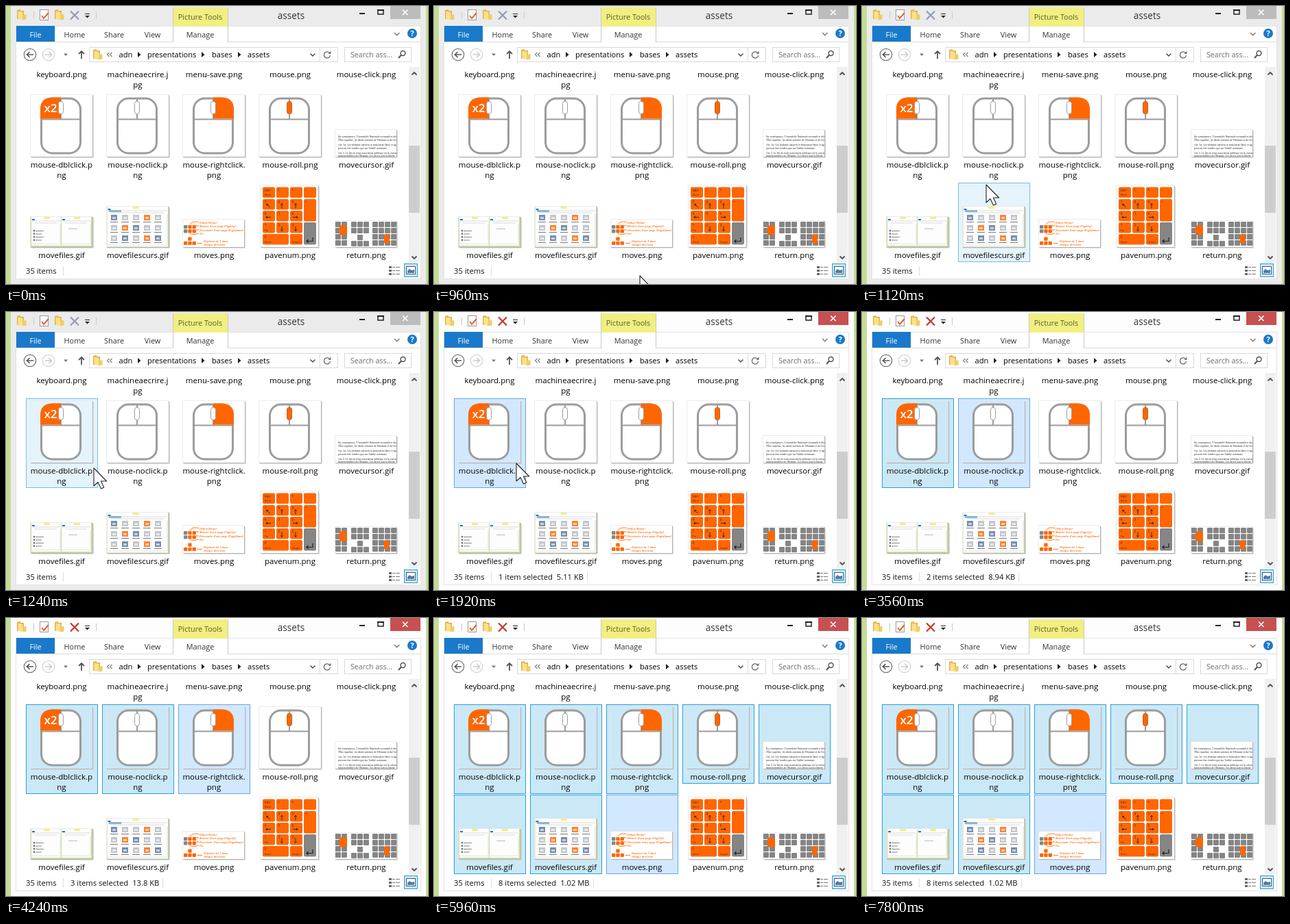
An HTML page for the animation above (8000 ms loop, 615 by 406 pixels).

```html
<!DOCTYPE html>
<html lang="en">
<head>
<meta charset="utf-8">
<title>Selecting several files</title>
<style>
html, body { margin: 0; width: 100%; height: 100%; overflow: hidden; background: #c5dc97; }
svg { display: block; width: 615px; height: 406px; font-family: "Open Sans", "Noto Sans", sans-serif; }
</style>
</head>
<body>
<svg id="stage" viewBox="0 0 615 406" xmlns="http://www.w3.org/2000/svg"></svg>
<script>
const LOOP = 8000, STEP = 40;
const ORANGE = '#ff6600', GREY = '#9c9c9c', KEY = '#858585', BLUE = '#1979ca';
const COLS = [29, 140, 251, 362, 473], CELL_W = 105;

const rect = (x, y, w, h, fill, more = '') =>
  `<rect x="${x}" y="${y}" width="${w}" height="${h}" fill="${fill}" ${more}/>`;
const box = (x, y, w, h, fill, line, more = '') =>
  rect(x + .5, y + .5, w - 1, h - 1, fill, `stroke="${line}" ${more}`);
const path = (d, line, width = 1, more = '') =>
  `<path d="${d}" fill="none" stroke="${line}" stroke-width="${width}" ${more}/>`;
const shape = (d, fill, more = '') => `<path d="${d}" fill="${fill}" ${more}/>`;
const text = (x, y, str, size, fill = '#111', more = '') =>
  `<text x="${x}" y="${y}" font-size="${size}" fill="${fill}" ${more}>${str}</text>`;
const mid = 'text-anchor="middle"';

// Rows of files: label lines per column
const rows = [
  { y: 104, names: ['keyboard.png', 'machineaecrire.j|pg', 'menu-save.png', 'mouse.png', 'mouse-click.png'] },
  { y: 236, names: ['mouse-dblclick.p|ng', 'mouse-noclick.p|ng', 'mouse-rightclick.|png', 'mouse-roll.png', 'movecursor.gif'] },
  { y: 368, names: ['movefiles.gif', 'movefilescurs.gif', 'moves.png', 'pavenum.png', 'return.png'] }
];
const cells = [];
rows.slice(1).forEach((row, i) => row.names.forEach((name, c) => cells.push({
  x: COLS[c], y: i ? 258 : 126, h: i ? 116 : name.includes('|') ? 131 : 116
})));

function labels() {
  return rows.map(row => row.names.map((name, c) => name.split('|').map((line, i) =>
    text(COLS[c] + 52, row.y + i * 15, line, 11.5, '#000', mid)).join('')).join('')).join('');
}

function thumb(x, y, w, h, fill = 'none') {
  return rect(x, y, w, h, fill) +
    path(`M${x - .5} ${y + h}V${y - .5}H${x + w}`, '#e6e6e6', 1, 'opacity=".8"') +
    path(`M${x + w + .5} ${y}V${y + h + .5}H${x}`, '#b4b4b4') +
    path(`M${x + w + 1.5} ${y + 2}V${y + h + 1.5}H${x + 2}`, '#d8d8d8', 1, 'opacity=".8"');
}

function mouse(c, kind) {
  const x = COLS[c] + 51;
  const dir = { left: -1, right: 1 }[kind];
  const button = dir && `M${x} 133.5H${x + dir * 13}Q${x + dir * 30} 134 ${x + dir * 30} 151V164.5H${x}Z`;
  const wheel = kind === 'wheel' ? [ORANGE, '#c2622a'] : ['#fff', GREY];
  return thumb(COLS[c] + 7, 130, 90, 90) +
    rect(x - 28.5, 135, 57, 80, '#fff', `rx="16" stroke="${GREY}" stroke-width="3"`) +
    path(`M${x - 28} 165.5H${x + 28}M${x} 135V165`, GREY, 2) +
    (button ? shape(button, ORANGE) : '') +
    rect(x - 3.5, 139.5, 7, 18, wheel[0], `rx="3" stroke="${wheel[1]}"`) +
    (kind === 'left' ? text(x - 15, 155, 'x2', 17, '#fff', 'font-weight="600" ' + mid) : '');
}

function legalText() {
  const lines = [
    [191.5, "En conséquence, l'Assemblée Nationale reconnaît et déclare, en présence"],
    [196.5, "l'Être suprême, les droits suivants de l'Homme et du Citoyen."],
    [204, 'Art. 1er. Les hommes naissent et demeurent libres et égaux en droits. Les'],
    [208.5, "peuvent être fondées que sur l'utilité commune."],
    [215.5, 'Art. 2. Le but de toute association politique est la conservation des droits'],
    [219.7, "imprescriptibles de l'Homme. Ces droits sont la liberté, la propriété,"]
  ];
  return thumb(480, 181, 89, 39, '#fff') + '<g clip-path="url(#legal)" font-family="Liberation Serif, serif">' +
    lines.map(([y, s]) => text(484, y, s, 3.8, '#222')).join('') + '</g>';
}

function miniWindow(x, y, w, h) {
  return rect(x, y, w, h, '#fdfdfd') + rect(x + w * .42, y, 9, 3, '#f3ee86') +
    rect(x + 1, y + 3, 4, 2, BLUE) + path(`M${x + 1} ${y + 6}h${w - 2}M${x + 5} ${y + 9}h${w - 11}`, '#ccc', .7) +
    path(`M${x + w - 1} ${y + 11}v${h - 15}`, '#ddd') + rect(x, y + h - 3, w, 1, '#e3e3e3');
}

function movefiles() {
  let s = thumb(36, 308, 90, 44, '#c5dc97') + miniWindow(37, 308, 43, 42) + miniWindow(81, 308, 43, 42);
  for (let i = 0; i < 4; i++)
    s += rect(40, 327 + i * 4.5, 2, 2.5, '#667') + rect(43, 328 + i * 4.5, i % 2 ? 9 : 12, 1, '#888');
  return s + rect(91, 325, 13, 1, '#bbb');
}

function movefilescurs() {
  let s = thumb(147, 293, 90, 59, '#c5dc97') + miniWindow(147.5, 293, 88.5, 58.5) +
    rect(150, 298, 18, 3, '#5f9bd0', 'opacity=".7"');
  for (let r = 0; r < 3; r++) for (let c = 0; c < 5; c++) {
    const x = 152 + c * 16, y = 305 + r * 15;
    const fill = (r * 2 + c) % 4 === 3 ? ORANGE : (r + c) % 3 ? '#b4b9c2' : '#55759c';
    s += rect(x + 1, y, 9, 8, fill, 'opacity=".8"') + rect(x + 3, y + 3, 5, 3, '#fff', 'opacity=".6"') +
      rect(x, y + 10, 11, 1, '#777');
  }
  return s;
}

function keys(x, y, cols, n, pitch, hot = false) {
  let s = '';
  for (let i = 0; i < n; i++)
    s += rect(x + i % cols * pitch, y + Math.floor(i / cols) * pitch, pitch - 1, pitch - 1,
      hot && i % cols ? ORANGE : KEY, 'rx="1"');
  return s;
}

function moves() {
  const word = (x, y, str) => text(x, y, str, 4.1, ORANGE, 'font-style="italic" font-weight="600"');
  return thumb(258, 312, 89, 40, '#fff') +
    keys(259, 320, 3, 6, 6.3, true) +
    path('M268 319C271 314 276 315 281 315.5M277 321Q279 320 281 321.5M277 327H281M268 332C271 335 277 333 281 332', ORANGE, .9) +
    word(282, 317.5, 'Début (Home)') + word(282, 323, "Monter d'une page (PageUp)") +
    word(282, 328.5, "Descendre d'une page (PageDown)") + word(282, 334, 'Fin') +
    rect(265.3, 337.5, 5.3, 5.3, ORANGE, 'rx="1"') +
    [259, 265.3, 271.6].map(x => rect(x, 343.8, 5.3, 5.3, ORANGE, 'rx="1"')).join('') +
    path('M279 346.5H286', ORANGE, .9) +
    word(288, 345, 'Déplacer de 1 dans') + word(288, 350, 'chaque direction');
}

function numpad() {
  const X = [374, 394, 414, 434], Y = [264.5, 282, 299, 316, 333];
  const key = (c, r, label = '', sub = '', w = 18, h = 15.5, fill = ORANGE) =>
    rect(X[c], Y[r], w, h, fill, 'rx="2"') + text(X[c] + 2.5, Y[r] + 6, label, 5, '#5a2600') +
    text(X[c] + 2.5, Y[r] + 12.5, sub, 4.3, '#5a2600');
  const arrow = (c, r, turn) => `<g transform="translate(${X[c] + 8} ${Y[r] + 9.5}) rotate(${turn})">` +
    path('M0 4V-3M-1.6 -1L0 -3.2L1.6 -1', '#222', .9) + '</g>';
  return thumb(371, 262, 84, 90) +
    key(0, 0, 'Verr', 'Num') + key(1, 0, '/') + key(2, 0, '*') + key(3, 0, '-') +
    key(0, 1, '7') + key(1, 1, '8') + key(2, 1, '9') + key(3, 1, '+', '', 18, 32.5) +
    key(0, 2, '4') + key(1, 2, '5') + key(2, 2, '6') +
    key(0, 3, '1', 'Fin') + key(1, 3, '2') + key(2, 3, '3') + key(3, 3, '', '', 18, 32.5, KEY) +
    key(0, 4, '0', 'Inser', 38) + key(2, 4, '.', 'Suppr') +
    arrow(0, 1, -45) + arrow(1, 1, 0) + arrow(2, 1, 0) + arrow(0, 2, -90) + arrow(2, 2, 90) +
    arrow(1, 3, 180) + arrow(2, 3, 180) +
    path('M447 338V343.5H438M440.5 341L438 343.5L440.5 346', '#222', 1.2);
}

function returnKeys() {
  return thumb(480, 314, 89, 38, '#fff') +
    keys(480, 315, 2, 8, 9) + rect(486, 320.5, 11, 14, ORANGE, 'rx="1"') +
    keys(503, 315, 3, 6, 9) + keys(512, 334, 1, 1, 9) + keys(503, 343, 3, 3, 9) +
    keys(534, 315, 4, 16, 9) + rect(551, 333.5, 7.5, 13, ORANGE, 'rx="1"');
}

const folder = (x, y) => shape(`M${x} ${y + 1}l5 -1v2h5v12h-10z`, '#e3b341') +
  shape(`M${x + 1.5} ${y + 2.5}l7 1.5v11.5l-7 -2z`, '#fbe18d') + shape(`M${x + 8.5} ${y + 8}l5 -1v7.5l-5 1z`, '#f0cc62');
const arrowhead = x => shape(`M${x - 2} 67l4.5 4l-4.5 4z`, '#222');

function titleBar() {
  return folder(16, 5) + path('M40.5 8V19M131.5 8V19M243.5 2V53M323.5 2V53', '#c9c9c9') +
    box(49, 5, 13, 16, '#fff', '#9a9a9a') + path('M52 14l3 4l7 -8', '#d9622f', 1.9) +
    folder(71, 5) + path('M94 7.5L106 19.5M106 7.5L94 19.5', '#8f9bb5', 2.2, 'id="trash"') +
    path('M115 11.5h7', '#222') + shape('M115 14h7l-3.5 3.5z', '#222') +
    rect(244, 2, 79, 28, '#f1ef80') + text(283, 20, 'Picture Tools', 10.9, '#5c5a2e', mid) +
    text(415.5, 19, 'assets', 13.6, '#333', mid) +
    rect(515, 10, 8, 2, '#222') + rect(542, 6, 8, 6, 'none', 'stroke="#222" stroke-width="1.5"') +
    rect(541, 5, 10, 2, '#222') + rect(560, 0, 44, 19, '#bcbcbc', 'id="close"') +
    path('M578 5.5l7.5 7.5M585.5 5.5l-7.5 7.5', '#fff', 1.7);
}

function ribbon() {
  const tab = (x, name, fill = '#333') => text(x, 45.5, name, 10.9, fill, mid);
  return rect(15, 29, 56, 23, BLUE) + rect(244, 30, 79, 23, '#fff') +
    tab(43, 'File', '#fff') + tab(100, 'Home') + tab(157.5, 'Share') + tab(213.5, 'View') + tab(283, 'Manage') +
    path('M566 39l3.7 3.7l3.7 -3.7', '#777', 1.4) +
    `<circle cx="592" cy="40" r="7" fill="${BLUE}"/>` + text(592, 44, '?', 11, '#fff', 'font-weight="700" ' + mid) +
    path('M14 52.5H243M324 52.5H604', '#dadbdc');
}

function navigation() {
  return '<g fill="none" stroke="#777" stroke-width="1.3"><circle cx="35" cy="71" r="8.7"/><circle cx="62" cy="71" r="8.7" stroke="#d4d4d4"/></g>' +
    path('M40 71H31M34.5 67L30.5 71L34.5 75', '#555', 1.7) + path('M57 71H66M62.5 67L66.5 71L62.5 75', '#ccc', 1.7) +
    shape('M84 69.5h6l-3 3.5z', '#777') + path('M110 77V66.5M106 70L110 66L114 70', '#555', 1.8) +
    box(121, 60, 363, 22, '#fff', '#d9d9d9') + path('M457.5 60V82', '#d9d9d9') + folder(127, 63) +
    path('M150.5 68l-3 3l3 3M154.5 68l-3 3l3 3', '#777', 1.1) +
    [[164.5, 'adn'], [206, 'presentations'], [300, 'bases'], [352, 'assets']].map(([x, n]) => text(x, 75, n, 11.1, '#000')).join('') +
    [194, 287, 340].map(arrowhead).join('') +
    path('M443.5 69.5l3.5 3.5l3.5 -3.5', '#444', 1.4) +
    path('M471.5 68.5A4.6 4.6 0 1 0 472.5 72', '#666', 1.3) + shape('M469.5 69.8h4v-4z', '#666') +
    box(493, 60, 98, 22, '#fff', '#d9d9d9') + text(502, 75, 'Search ass...', 10.7, '#6d6d6d') +
    '<circle cx="578.5" cy="69" r="3.4" fill="none" stroke="#555" stroke-width="1.5"/>' + path('M576 71.5L572 76', '#555', 2);
}

function scrollBar() {
  return rect(587, 89, 16, 285, '#f0f0f0') + rect(587, 204, 16, 98, '#cdcdcd') +
    path('M591.5 100.5l3.5 -3.5l3.5 3.5M591.5 365.5l3.5 3.5l3.5 -3.5', '#505050', 1.9);
}

function statusBar() {
  return text(29, 391, '35 items', 11.2) + path('M83.5 380V394', '#ddd') +
    text(94, 391, '', 11.2, '#111', 'id="status"') + path('M.5 380V394', '#ddd', 1, 'id="divider"') +
    [380, 385, 390].map(y => rect(558, y, 4, 3, '#666') + rect(563, y + 1, 4, 1, '#777') + rect(568, y + 1, 6, 1, '#777')).join('') +
    box(580, 376, 20, 20, '#cbe8f6', '#26a0da') + box(583, 380, 14, 12, '#fff', '#555') + shape('M585 390v-3l3 -3l3 2l4 -1v5z', '#3f7fb5');
}

const stage = document.getElementById('stage');
stage.innerHTML = `<defs><clipPath id="legal"><rect x="480" y="181" width="89" height="39"/></clipPath></defs>` +
  rect(7, 0, 605, 406, '#ebebeb', 'id="frame"') + box(14, 29, 591, 370, '#fff', '#e3e3e3') +
  titleBar() + ribbon() + navigation() + scrollBar() + statusBar() +
  cells.map((c, i) => box(c.x, c.y, CELL_W, c.h, 'none', 'none', `id="cell${i}"`)).join('') +
  mouse(0, 'left') + mouse(1) + mouse(2, 'right') + mouse(3, 'wheel') + legalText() +
  movefiles() + movefilescurs() + moves() + numpad() + returnKeys() + labels() +
  shape('M0 0V26L6 20.5L10.5 30L14.7 28.2L10.4 19H18.6Z', '#fff', 'id="cursor" stroke="#222" stroke-width="1.1" stroke-linejoin="round"');

const el = id => document.getElementById(id);
const cellEls = cells.map((_, i) => el('cell' + i));

// Pointer keys: time, x, y
const tracks = [
  [[960, 300, 394], [1120, 181, 261], [1240, 128, 228], [1400, 117, 216], [1880, 117, 216],
   [1920, 120, 221], [2040, 152, 275], [2160, 190, 392], [2200, 190, 406]],
  [[7720, 256, 375], [7760, 445, 380], [7800, 464, 406]]
];
// Time, status text, size text
const picks = [
  [1720, '1 item selected', '5.11 KB'], [3560, '2 items selected', '8.94 KB'],
  [4240, '3 items selected', '13.8 KB'], [5960, '8 items selected', '1.02 MB']
];

function pointer(t) {
  for (const track of tracks) {
    for (let i = 1; i < track.length; i++) {
      const [t0, x0, y0] = track[i - 1], [t1, x1, y1] = track[i];
      if (t < t0 || t >= t1) continue;
      const k = (t - t0) / (t1 - t0);
      return [x0 + (x1 - x0) * k, y0 + (y1 - y0) * k];
    }
  }
  return null;
}

function paint(node, fill, line) {
  node.setAttribute('fill', fill);
  node.setAttribute('stroke', line);
}

function draw(time) {
  const t = Math.floor(time / STEP) * STEP;
  const tip = pointer(t), active = t >= 1600;
  const count = t >= 5960 ? 8 : t >= 4240 ? 3 : t >= 3560 ? 2 : active ? 1 : 0;
  cells.forEach((c, i) => {
    const hot = tip && tip[0] >= c.x && tip[0] < c.x + CELL_W && tip[1] >= c.y && tip[1] < c.y + c.h;
    if (i < count - 1) paint(cellEls[i], '#cbe8f6', '#26a0da');
    else if (i === count - 1) paint(cellEls[i], '#d1e8ff', '#66a7e8');
    else if (hot) paint(cellEls[i], '#e5f3fb', '#70c0e7');
    else paint(cellEls[i], 'none', 'none');
  });
  el('cursor').setAttribute('visibility', tip ? 'visible' : 'hidden');
  if (tip) el('cursor').setAttribute('transform', `translate(${tip[0]} ${tip[1]})`);
  el('frame').setAttribute('fill', active ? '#fdfdfd' : '#ebebeb');
  el('close').setAttribute('fill', active ? '#c75050' : '#bcbcbc');
  const pick = picks.filter(p => t >= p[0]).pop();
  el('trash').setAttribute('stroke', pick ? '#c0392b' : '#8f9bb5');
  el('status').innerHTML = pick ? `${pick[1]}<tspan dx="6">${pick[2]}</tspan>` : '';
  el('divider').setAttribute('visibility', pick ? 'visible' : 'hidden');
  const end = Math.round(94 + el('status').getComputedTextLength() + 11);
  el('divider').setAttribute('transform', `translate(${end} 0)`);
}

const start = performance.now();
function tick() {
  draw((performance.now() - start) % LOOP);
  requestAnimationFrame(tick);
}
tick();
</script>
</body>
</html>
```
